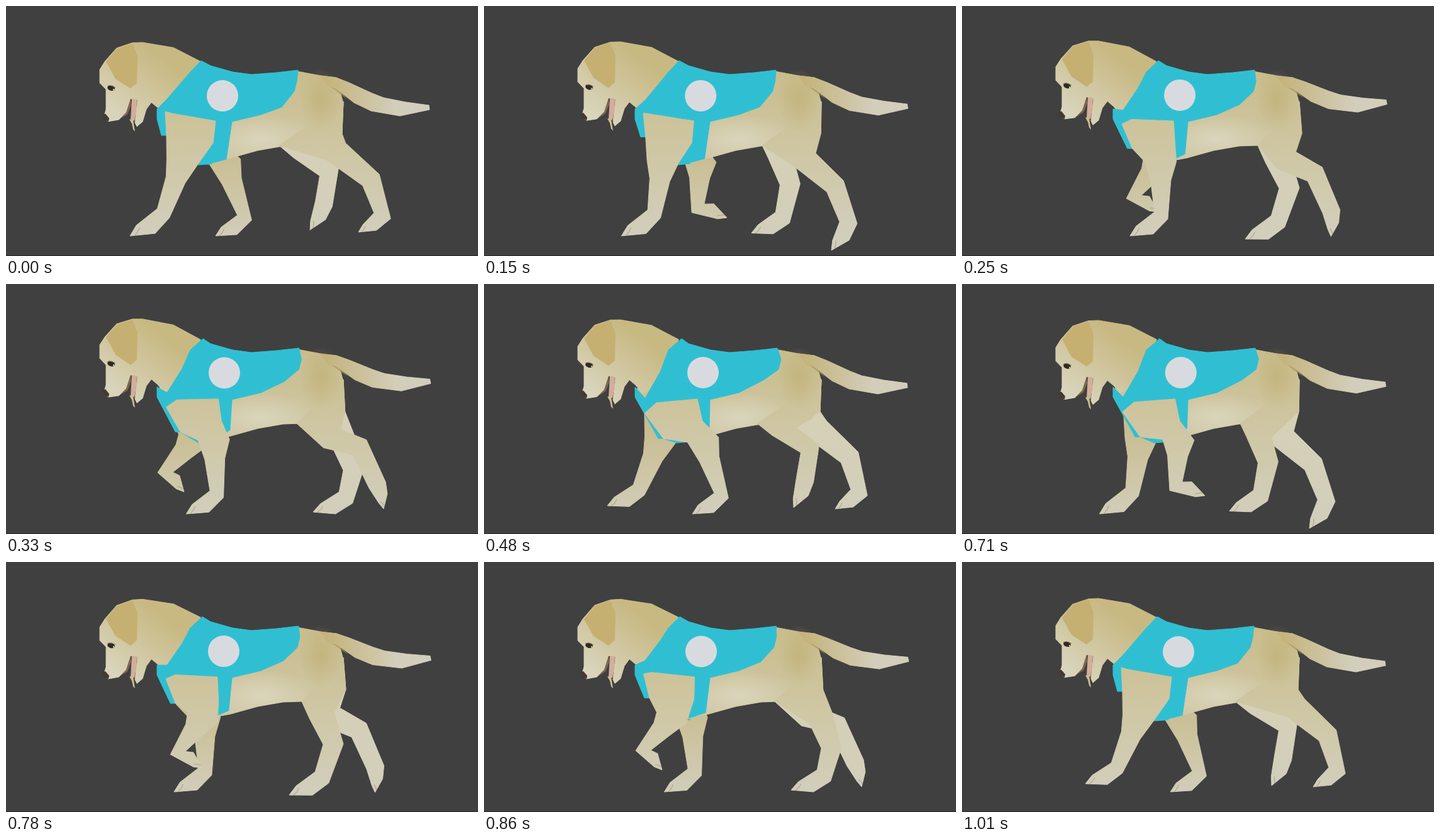
These frames come from a looping animation (750x398 px, 1.09 s). An HTML page:

```html
<!DOCTYPE html>
<html lang="en">
<head>
<meta charset="utf-8">
<title>Walking dog</title>
<style>
html, body { margin: 0; width: 100%; height: 100%; overflow: hidden; background: #404040; }
svg { display: block; width: 100%; height: 100%; }
.coat { fill: url(#coat); stroke: url(#coat); }
.farFront { fill: url(#farCoat); stroke: url(#farCoat); }
.farHind { fill: url(#paleCoat); stroke: url(#paleCoat); }
.crease { fill: none; stroke: #8f7d5c; stroke-opacity: .45; stroke-width: 1.3; }
</style>
</head>
<body>
<svg viewBox="0 0 750 398">
  <defs>
    <linearGradient id="coat" gradientUnits="userSpaceOnUse" x1="0" y1="60" x2="0" y2="366">
      <stop offset="0" stop-color="#c7b780"/><stop offset=".2" stop-color="#cabe8f"/>
      <stop offset=".5" stop-color="#cec5a0"/><stop offset=".72" stop-color="#d0caac"/>
      <stop offset="1" stop-color="#d1cebc"/>
    </linearGradient>
    <linearGradient id="farCoat" gradientUnits="userSpaceOnUse" x1="0" y1="225" x2="0" y2="366">
      <stop offset="0" stop-color="#c8bc90"/><stop offset=".5" stop-color="#cdc5a3"/>
      <stop offset="1" stop-color="#d1cdb9"/>
    </linearGradient>
    <linearGradient id="paleCoat" gradientUnits="userSpaceOnUse" x1="0" y1="200" x2="0" y2="366">
      <stop offset="0" stop-color="#d6d1b6"/><stop offset="1" stop-color="#d1cebb"/>
    </linearGradient>
    <linearGradient id="face" gradientUnits="userSpaceOnUse" x1="155" y1="165" x2="225" y2="70">
      <stop offset="0" stop-color="#d9d5bc"/><stop offset=".5" stop-color="#d0c69f"/>
      <stop offset="1" stop-color="#c8b983"/>
    </linearGradient>
    <linearGradient id="tail" gradientUnits="userSpaceOnUse" x1="510" y1="0" x2="620" y2="0">
      <stop offset="0" stop-color="#c4b47c"/><stop offset="1" stop-color="#d3cebb"/>
    </linearGradient>
    <radialGradient id="shade">
      <stop offset="0" stop-color="#bba968" stop-opacity=".5"/><stop offset="1" stop-color="#bba968" stop-opacity="0"/>
    </radialGradient>
    <radialGradient id="light">
      <stop offset="0" stop-color="#dad5bc"/><stop offset="1" stop-color="#dad5bc" stop-opacity="0"/>
    </radialGradient>
    <clipPath id="inTorso"><use href="#torso"/></clipPath>
  </defs>
  <rect width="750" height="398" fill="#404040"/>
  <rect y="397" width="750" height="1" fill="#2c2527"/>
  <path id="farHind" class="farHind"/><path id="farHindToe" class="crease"/>
  <path id="farFront" class="farFront"/><path id="farFrontToe" class="crease"/>
  <path id="torso" class="coat" d="M300 92L390 112 463 104 500 111 525 114 536 155 534 190 520 215 485 232 470 222 440 223 400 230 357 242 330 247 303 250 270 225 255 200 241 170Z"/>
  <ellipse cx="405" cy="212" rx="95" ry="40" fill="url(#light)" clip-path="url(#inTorso)"/>
  <path id="nearHind" class="coat"/><path id="nearHindToe" class="crease"/>
  <ellipse cx="500" cy="150" rx="34" ry="50" fill="url(#shade)"/>
  <g id="wag">
    <path fill="url(#tail)" stroke="url(#tail)" d="M500 111L525 114 545 122 582 139 600 146 635 153 672 158 673 165 626 175 580 167 553 154 530 136 512 128Z"/>
    <path d="M517 129Q529 133 542 148L532 141Z" fill="#a8935a" opacity=".7"/>
  </g>
  <g id="head">
    <path fill="url(#face)" stroke="url(#face)" d="M148 105L156 92 175 70 200 61 216 60 265 67 308 88 300 150 250 175 240 163 230 155 222 166 216 186 207 194 204 188 208 152 197 150 190 172 178 184 162 187 154 182 158 168 158 136 148 126Z"/>
    <path fill="#c5b072" d="M158 92L175 71 200 62 208 82 207 125 197 134 173 119Z"/>
    <path d="M197 150L190 172 180 183 192 175 198 160Z" fill="#7d664e"/>
    <path d="M199 150L207 151 206 170 203 185 197 184Z" fill="#d2ae9b"/>
    <path d="M195 183L201 183 202 190 204 202 201 199 199 190Z" fill="#cdbd93"/>
    <path d="M151 177L157 175 163 182 162 187 154 184Z" fill="#463930"/>
    <ellipse cx="166" cy="134" rx="6" ry="4" transform="rotate(12 166 134)" fill="#2f2a25"/>
    <path d="M160 131Q166 128 173 133" fill="none" stroke="#8b7b58"/>
    <circle cx="170" cy="136" r="1.200" fill="#c9c6bd"/>
  </g>
  <path id="vest" fill="#30bfd2" stroke="#30bfd2"/>
  <circle id="badge" cx="346" cy="142" r="25" fill="#d7dbdf"/>
  <path id="nearFront" class="coat"/><path id="nearFrontToe" class="crease"/>
</svg>
<script>
const LOOP = 1090, CYCLE = 14, HALF = CYCLE / 2;
const starts = [0, 80, 150, 250, 330, 400, 480, 550, 630, 710, 780, 860, 940, 1010];
// The stride advances unevenly; both halves of the cycle share this pace.
const pace = [0, .7, 1.1, 3.6, 4.6, 5.7, 6.9];

// Stride phase, then joints from top to toe.
const frontKeys = [ // wrist, toe
  [0, [250, 330], [197, 366]],
  [7, [379, 337], [333, 366]],
  [7.7, [348, 320], [380, 371]],
  [8.1, [340, 322], [386, 337]],
  [10.6, [273, 304], [312, 328]],
  [11.6, [253, 300], [283, 331]],
  [13.9, [246, 328], [196, 353]]
];
const hindKeys = [ // knee, hock, ankle, toe
  [0, [525, 232], [580, 277], [598, 334], [560, 360]],
  [1.1, [510, 245], [558, 287], [579, 345], [552, 389]],
  [4.6, [518, 246], [562, 260], [590, 320], [600, 358]],
  [6.9, [477, 235], [518, 262], [510, 312], [492, 356]],
  [7.7, [467, 243], [481, 283], [470, 336], [421, 360]],
  [10.6, [502, 245], [520, 290], [502, 343], [450, 371]],
  [11.6, [535, 248], [552, 296], [540, 340], [488, 363]],
  [13.9, [530, 232], [581, 276], [596, 332], [558, 358]]
];

const el = id => document.getElementById(id);
const mix = (a, b, t) => a.map((n, i) => n + (b[i] - n) * t);
const unit = (a, b) => {
  const x = b[0] - a[0], y = b[1] - a[1], d = Math.hypot(x, y);
  return [x / d, y / d];
};
const angle = phase => phase / CYCLE * 2 * Math.PI;
const trace = points => "M" + points.map(p => p.map(n => n.toFixed(1))).join(" ");

function joints(keys, phase) {
  const p = phase % CYCLE;
  const i = keys.findLastIndex(key => key[0] <= p);
  const [from, ...a] = keys[i];
  const [to, ...b] = keys[i + 1] || [CYCLE, ...keys[0].slice(1)];
  return a.map((point, j) => mix(point, b[j], (p - from) / (to - from)));
}

// Rear and front edge of a joint, square to the bend between its neighbours.
function edges(before, p, after, width) {
  const a = unit(before, p), b = unit(p, after);
  const [x, y] = unit([0, 0], [a[0] + b[0], a[1] + b[1]]);
  return [1, -1].map(s => [p[0] + s * width * y, p[1] - s * width * x]);
}

function drawLeg(id, top, root, chain, widths, toe) {
  const line = [root, ...chain, toe];
  const sides = chain.map((p, i) => edges(line[i], p, line[i + 2], widths[i]));
  const [ax, ay] = chain.at(-1), dx = toe[0] - ax, dy = toe[1] - ay;
  const paw = (along, out) => [ax + along * dx + out * dy, ay + along * dy - out * dx];
  const outline = [...top, ...sides.map(s => s[0]), paw(.45, .3), toe, paw(.72, -.13),
    ...sides.map(s => s[1]).reverse()];
  el(id).setAttribute("d", trace(outline) + "Z");
  el(id + "Toe").setAttribute("d", trace([paw(.9, .06), paw(.78, .02), paw(.68, -.04)]));
}

const chest = c => [270 - 15 * c, 226 - 20 * c];

function drawFront(id, phase) {
  const c = Math.cos(angle(phase));
  const [wrist, toe] = joints(frontKeys, phase);
  const elbow = [314 - 34 * c, 248];
  const top = [chest(c), [254 - c, 187 - 19 * c], [269 - 5 * c, 180 - 9 * c], [336 - 3 * c, 183], [338 - 9 * c, 218]];
  drawLeg(id, top, [elbow[0], 180], [elbow, mix(elbow, wrist, .35), wrist], [25, 16, 12], toe);
}

function drawHind(id, phase) {
  const swing = Math.cos(2 * angle(phase));
  const [knee, hock, ankle, toe] = joints(hindKeys, phase);
  const top = [[452 - 18 * swing, 222], [536, 152], [537 - 3 * swing, 203]];
  drawLeg(id, top, [495, 190], [knee, hock, ankle], [20, 16, 14], toe);
}

function drawVest(c) {
  const [x, y] = chest(c);
  el("vest").setAttribute("d", trace([
    [312 - 2 * c, 87], [325, 95], [360, 105], [390, 109], [430, 106], [465 - c, 102],
    [467 - 5 * c, 120], [463 - 5 * c, 136], [441 - 3 * c, 157 + 4 * c], [405, 173], [359, 184],
    [354 - 4 * c, 236 + 8 * c], [337 - 18 * c, 244 + 8 * c], [325 - 22 * c, 243 + 8 * c],
    [328, 251], [306, 253], [x, y], [x - 8, y],
    [240, 180], [240, 164], [256, 165 - 17 * c], [280, 130 - 10 * c], [293, 105]
  ]) + "Z");
}

function draw(step) {
  const phase = pace[step % HALF] + (step < HALF ? 0 : HALF);
  const a = angle(phase), c = Math.cos(a), bob = Math.cos(2 * a);
  drawFront("nearFront", phase);
  drawFront("farFront", phase + HALF);
  drawHind("nearHind", phase);
  drawHind("farHind", phase + HALF);
  drawVest(c);
  const nod = 1.7 + 1.3 * Math.sin(a - .25);
  el("head").setAttribute("transform", `translate(301 0) skewY(${nod}) translate(-300 0)`);
  el("wag").setAttribute("transform", `rotate(${1.6 * (bob - 1)} 520 120)`);
  el("badge").setAttribute("transform", `translate(${-2 * c} ${c})`);
}

function tick() {
  const t = performance.now() % LOOP;
  draw(starts.findLastIndex(s => s <= t));
  requestAnimationFrame(tick);
}
tick();
</script>
</body>
</html>
```
